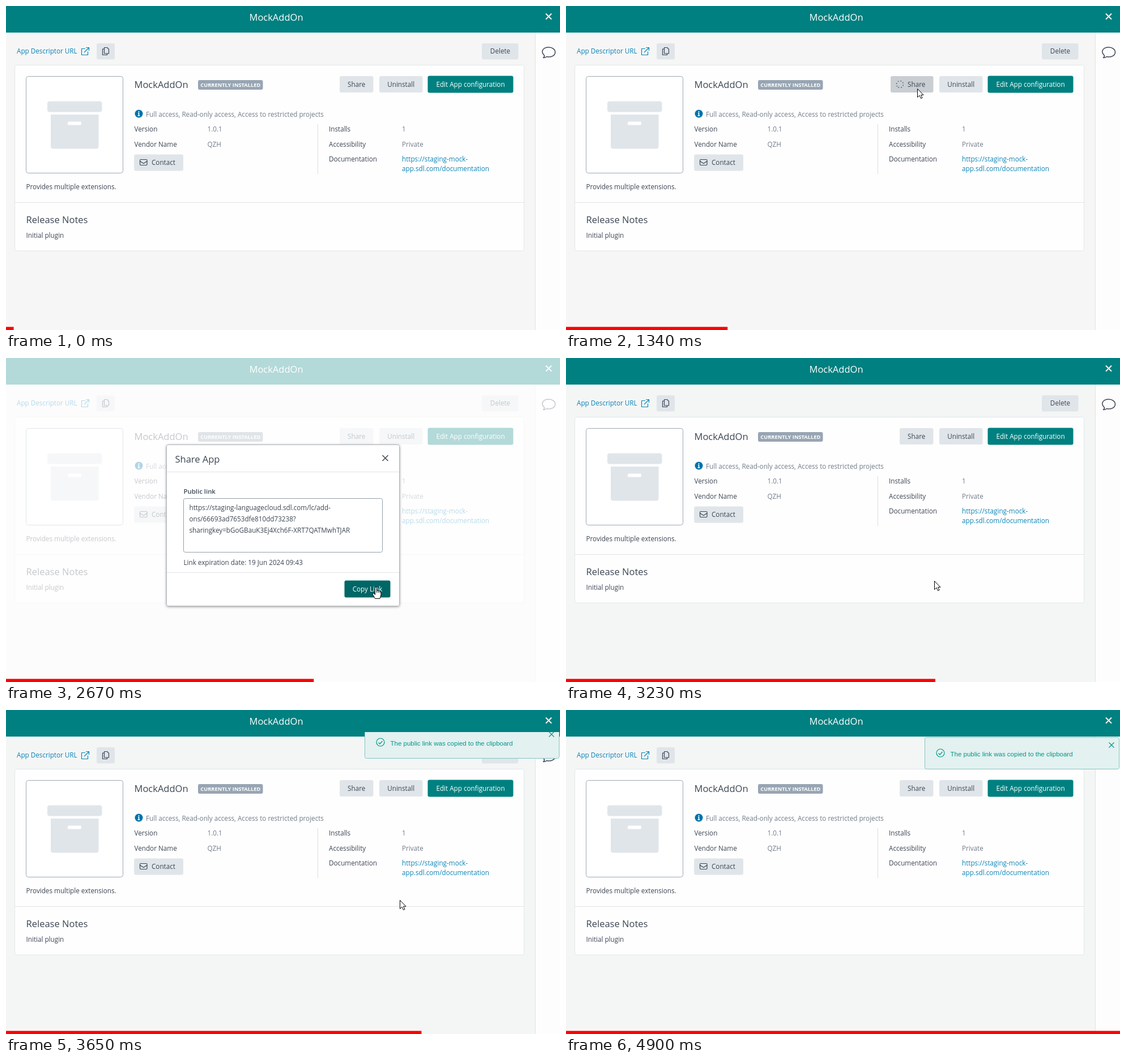
An HTML page for the animation above (4.97 s loop, 978 by 573 pixels).

```html
<!DOCTYPE html>
<html lang="en">
<head>
<meta charset="utf-8">
<title>Share app</title>
<style>
html, body { margin: 0; width: 100%; height: 100%; overflow: hidden; background: #f6f6f6; }
svg { display: block; width: 100%; height: 100%; }
text { font: 11.7px "Open Sans", "Noto Sans", sans-serif; fill: #3c4653; white-space: pre; }
.h { font-size: 16.5px; }
.mid { text-anchor: middle; }
.soft { fill: #727d8b; }
.link { fill: #0b84b8; }
.light { fill: #fff; }
.bold { font-size: 11.4px; font-weight: 600; }
.badge { font-size: 9.3px; font-weight: 700; fill: #fff; }
.btn { fill: #e0e5ea; }
.teal { fill: #008080; }
.line { fill: none; stroke: #e0e4e7; }
.icon { fill: none; stroke: #3c4653; stroke-width: 1.2; stroke-linejoin: round; }
.thick { stroke-width: 1.5; }
#toast text { font: 11.5px "Liberation Sans", Arial, sans-serif; fill: #009688; }
#toast .icon { stroke: #009688; }
</style>
</head>
<body>
<svg viewBox="0 0 978 573">
  <defs>
    <filter id="shadow" x="-5%" y="-5%" width="110%" height="112%">
      <feDropShadow dx="0" dy="1" stdDeviation="2" flood-color="#000" flood-opacity=".4"/>
    </filter>
    <clipPath id="slot"><rect x="633" y="39" width="345" height="80"/></clipPath>
  </defs>

  <rect id="page" width="978" height="573"/>
  <rect x="935" y="47" width="43" height="526" fill="#fdfdfd"/>
  <path class="line" d="M934.5 47V573"/>
  <rect class="teal" width="978" height="47"/>
  <text class="h mid light" x="477" y="26">MockAddOn</text>
  <path d="M953 13.500l10 10m0-10l-10 10" fill="none" stroke="#fff" stroke-width="1.8"/>
  <path class="icon thick" d="M948.500 91.500C950.500 90 951 88.500 950 87C943 80 948.500 73 958 73C965 73 969.500 77 969.500 81.500C969.500 88 962 91.500 954.500 89.500C952.500 91 950.500 91.700 948.500 91.500Z"/>

  <text class="link" x="19" y="84">App Descriptor URL</text>
  <path class="icon" style="stroke:#0b84b8" d="M140 75.500h-6.500v11h11v-6M138 82l8-8m-5-.5h5.500v5.500"/>
  <rect class="btn" x="160" y="66" width="32" height="28.500" rx="3"/>
  <path class="icon" d="M173.500 73.500h5l3 3v7.500h-8zM173.500 76h-3v10.500h8v-2.500"/>
  <rect class="btn" x="840" y="66" width="64.500" height="28.500" rx="3"/>
  <text class="mid" x="872.500" y="84">Delete</text>

  <rect x="15.500" y="104.500" width="899" height="328.500" rx="3" fill="#fefefe" stroke="#e3e6e8"/>
  <path class="line" d="M16 347.500H914"/>
  <rect x="35.500" y="124.500" width="171" height="171" rx="4" fill="#fff" stroke="#9ca9b4"/>
  <g class="btn">
    <rect x="73" y="168.500" width="96.500" height="19" rx="4"/>
    <path d="M79 192h84.500v56q0 4.500-4.500 4.500h-75.500q-4.500 0-4.500-4.500z"/>
  </g>
  <rect x="109" y="204.500" width="24" height="6" rx="2" fill="#fff"/>

  <text class="h" x="226.500" y="145">MockAddOn</text>
  <rect x="339" y="131" width="114.500" height="17" rx="3" fill="#98a5b3"/>
  <text class="badge mid" x="396.300" y="143">CURRENTLY INSTALLED</text>
  <rect id="share" class="btn" y="124" height="29" rx="3"/>
  <text class="mid" x="618.700" y="142.500">Share</text>
  <circle id="spin" cx="589.500" cy="138.500" r="6" fill="none" stroke="#4b5563" stroke-width="1.5" stroke-dasharray="1.600 3.112"/>
  <rect class="btn" x="659" y="124" width="76.500" height="29" rx="3"/>
  <text class="mid" x="697.200" y="142.500">Uninstall</text>
  <rect class="teal" x="744.500" y="123.500" width="151" height="30" rx="3"/>
  <text class="mid light" x="820" y="142.500">Edit App configuration</text>

  <circle cx="234.500" cy="190.500" r="7" fill="#0072aa"/>
  <path d="M234.500 186v2M233 189.500h1.500v4.500m-2 0h4" fill="none" stroke="#fff" stroke-width="1.600"/>
  <text class="soft" x="247" y="195.500">Full access, Read-only access, Access to restricted projects</text>
  <text x="226.500" y="221.500">Version</text>
  <text class="soft" x="355.500" y="221.500">1.0.1</text>
  <text x="226.500" y="248.500">Vendor Name</text>
  <text class="soft" x="355.500" y="248.500">QZH</text>
  <path class="line" style="stroke:#d8dde1" d="M550.500 209V297"/>
  <text x="570" y="221.500">Installs</text>
  <text class="soft" x="699" y="221.500">1</text>
  <text x="570" y="248.500">Accessibility</text>
  <text class="soft" x="699" y="248.500">Private</text>
  <text x="570" y="275">Documentation</text>
  <text class="link" x="699" y="275">https://staging-mock-</text>
  <text class="link" x="699" y="292">app.sdl.com/documentation</text>
  <rect class="btn" x="226" y="262.500" width="87" height="29" rx="3"/>
  <path class="icon" d="M238 271.500h9.500q1.500 0 1.500 1.500v7q0 1.500-1.500 1.500h-9.500q-1.500 0-1.500-1.500v-7q0-1.500 1.500-1.500zM236.500 274.500l6.200 4 6.300-4"/>
  <text x="257" y="281">Contact</text>
  <text x="35.500" y="323.500">Provides multiple extensions.</text>
  <text class="h" x="35.500" y="384">Release Notes</text>
  <text x="35.500" y="409.500">Initial plugin</text>

  <g id="dialog">
    <rect width="978" height="573" fill="#fff" opacity=".7"/>
    <rect x="283.500" y="153.500" width="411" height="285" rx="3" fill="#fff" stroke="#b3b9be" filter="url(#shadow)"/>
    <text class="h" x="298.500" y="184.500">Share App</text>
    <path class="icon thick" d="M664.500 172l10 10m0-10l-10 10"/>
    <path class="line" d="M284 201.500h410M284 379.500h410"/>
    <text class="bold" x="313.500" y="240">Public link</text>
    <rect x="313.500" y="248.500" width="351" height="95" rx="3" fill="#fff" stroke="#939fa9"/>
    <text x="323.500" y="268.500">https://staging-languagecloud.sdl.com/lc/add-</text>
    <text x="323.500" y="288.500">ons/66693ad7653dfe810dd73238?</text>
    <text x="323.500" y="308.500">sharingkey=bGoGBauK3Ej4Xch6F-XRT7QATMwhTJAR</text>
    <text x="313.500" y="366">Link expiration date: 19 Jun 2024 09:43</text>
    <rect id="copy" x="597.500" y="393.500" width="81" height="30" rx="3"/>
    <text class="mid light" x="638" y="412.500">Copy Link</text>
  </g>

  <g clip-path="url(#slot)">
    <g id="toast">
      <rect x="633.500" y="48.500" width="343" height="56" rx="3" fill="#e3f1f0" stroke="#86c3c1"/>
      <circle class="icon" cx="661" cy="76" r="7"/>
      <path class="icon" d="M657.500 76.500l2.500 2.500 4.500-5M958.500 57.500l9 9m0-9l-9 9"/>
      <text x="678.500" y="82">The public link was copied to the clipboard</text>
    </g>
  </g>

  <rect id="bar" y="567.500" height="5.500" fill="#fe0000"/>
  <g id="cursor" fill="#fff" stroke="#000" stroke-linejoin="round">
    <path id="arrow" d="M.5.5V15.500L4 12.200L6.500 17.500L9 16.500L6.600 11.300H11Z"/>
    <path id="hand" d="M-1.500 11V1.500Q-1.500 0 0 0T1.500 1.500V6.500Q3 5.500 4.300 7Q6 6.200 7 7.800Q9 7.300 9 9.500V14L7 20.500H-1.500L-5.500 13.500Q-6.500 11-4.500 11Q-3.500 11-1.500 13.500ZM1.500 6.500V10M4.300 7.500V10M7 8.500V10.500"/>
  </g>
</svg>
<script>
const LOOP = 4970, STEPS = 72, WIDTH = 978;
const marks = [70, 600, 1150, 1690, 2250, 2810, 3360, 3920, 4480, 5040];
// pointer path: step, x, y
const path = [
  [1, 960, 540], [4, 846, 466], [8, 634, 371], [13, 622, 147], [20, 620, 146],
  [23, 610, 142], [27, 565, 125], [29, 557, 111], [32, 585, 284], [36, 653, 405],
  [43, 653, 404], [48, 649, 392], [53, 695, 336], [56, 742, 308], [58, 798, 301],
  [64, 962, 551]
];
const $ = id => document.getElementById(id);
const set = (id, attrs) => {
  for (const key in attrs) $(id).setAttribute(key, attrs[key]);
};
const show = (id, on) => set(id, { visibility: on ? "visible" : "hidden" });

function stepAt(t) {
  if (t < marks[0]) return 0;
  const g = marks.findLastIndex(m => m <= t);
  const gap = (marks[g + 1] - 70 - marks[g]) / 7;
  return Math.min(STEPS - 1, g * 8 + 1 + Math.min(7, Math.floor((t - marks[g] + 15) / gap)));
}

function pointAt(i) {
  const n = Math.max(1, path.findIndex(p => p[0] >= i));
  const [a, ax, ay] = path[n - 1], [b, bx, by] = path[n];
  const k = (i - a) / (b - a);
  return [Math.round(ax + (bx - ax) * k), Math.round(ay + (by - ay) * k)];
}

function draw(i) {
  const within = (a, b) => i >= a && i <= b;
  const busy = within(17, 21), open = within(22, 43);
  const overShare = within(13, 16), overCopy = within(36, 43);
  const hand = overShare || overCopy, seen = within(1, 64);

  set("page", { fill: i > 40 ? "#f4f6f6" : "#f6f6f6" });
  set("bar", { width: WIDTH * (i + 1) / STEPS });
  set("share", {
    x: busy ? 573 : 589,
    width: busy ? 75.5 : 59.5,
    style: busy || overShare ? "fill:#c9ced3" : ""
  });
  show("spin", busy);
  set("spin", { transform: `rotate(${i * 25} 589.5 138.5)` });
  show("dialog", open);
  set("copy", { fill: overCopy ? "#006666" : "#008080" });
  show("toast", i > 49);
  set("toast", { transform: `translate(0 ${Math.min(0, -66 + 11.75 * (i - 49))})` });
  show("arrow", seen && !hand);
  show("hand", seen && hand);
  if (seen) set("cursor", { transform: `translate(${pointAt(i)})` });
}

function tick() {
  draw(stepAt(performance.now() % LOOP));
  requestAnimationFrame(tick);
}
tick();
</script>
</body>
</html>
```
